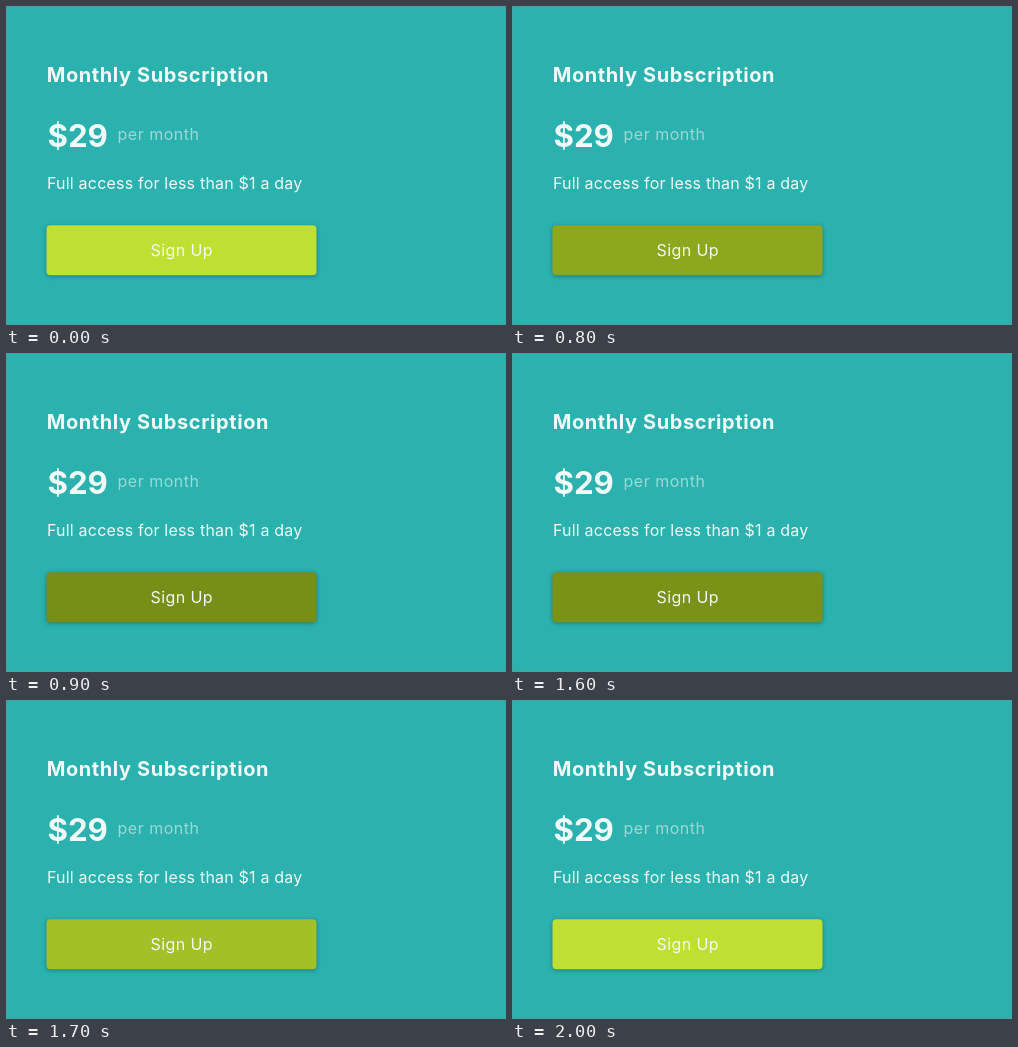
Write an HTML page that moves like this. It is 500 by 319 pixels and loops after 2500 ms.

```html
<!DOCTYPE html>
<html lang="en">
<head>
<meta charset="utf-8">
<title>Monthly Subscription</title>
<style>
  html, body { margin: 0; height: 100%; overflow: hidden; background: #2bb1ae; }
  svg { display: block; width: 500px; height: 319px; }
  text { font: 16px Inter, sans-serif; fill: #f0faf9; }
  .title { font-size: 20px; font-weight: 700; letter-spacing: .6px; }
  .price { font-size: 31.3px; font-weight: 700; }
  .period { fill: #9ed8d6; letter-spacing: .5px; }
  .note { letter-spacing: .2px; }
  .label { letter-spacing: .4px; text-anchor: middle; }
  #button { filter: drop-shadow(0 1px 2px rgba(0, 40, 40, .4)); }
</style>
</head>
<body>
<svg viewBox="0 0 500 319">
  <rect width="500" height="319" fill="#2bb1ae"/>
  <rect x=".5" y=".5" width="499" height="318" fill="none" stroke="#45a3a1"/>
  <text class="title" x="40.7" y="76">Monthly Subscription</text>
  <text class="price" x="41.4" y="141">$29</text>
  <text class="period" x="111.5" y="133.5">per month</text>
  <text class="note" x="41" y="182.5">Full access for less than $1 a day</text>
  <rect id="button" x="40.5" y="219.2" width="270" height="50" rx="4"/>
  <text class="label" x="175.7" y="249.7">Sign Up</text>
</svg>
<script>
  const LOOP = 2500, STEP = 100, FADE = 400;
  const PRESS = 657, RELEASE = 1547;
  const BRIGHT = [191, 224, 51], DARK = [111, 132, 19];
  const button = document.getElementById('button');

  const bezier = (a, b, u) => 3 * a * u * (1 - u) ** 2 + 3 * b * u * u * (1 - u) + u ** 3;

  // CSS "ease": cubic-bezier(.25, .1, .25, 1)
  function ease(x) {
    if (x <= 0) return 0;
    if (x >= 1) return 1;
    let low = 0, high = 1;
    for (let i = 0; i < 24; i++) {
      const mid = (low + high) / 2;
      if (bezier(.25, .25, mid) < x) low = mid; else high = mid;
    }
    return bezier(.1, 1, low);
  }

  function draw(now) {
    const t = Math.floor(now % LOOP / STEP) * STEP;
    const shade = ease((t - PRESS) / FADE) - ease((t - RELEASE) / FADE);
    const color = BRIGHT.map((c, i) => Math.round(c + (DARK[i] - c) * shade));
    button.setAttribute('fill', `rgb(${color})`);
  }

  const start = performance.now();
  function tick() {
    draw(performance.now() - start);
    requestAnimationFrame(tick);
  }
  tick();
</script>
</body>
</html>
```
